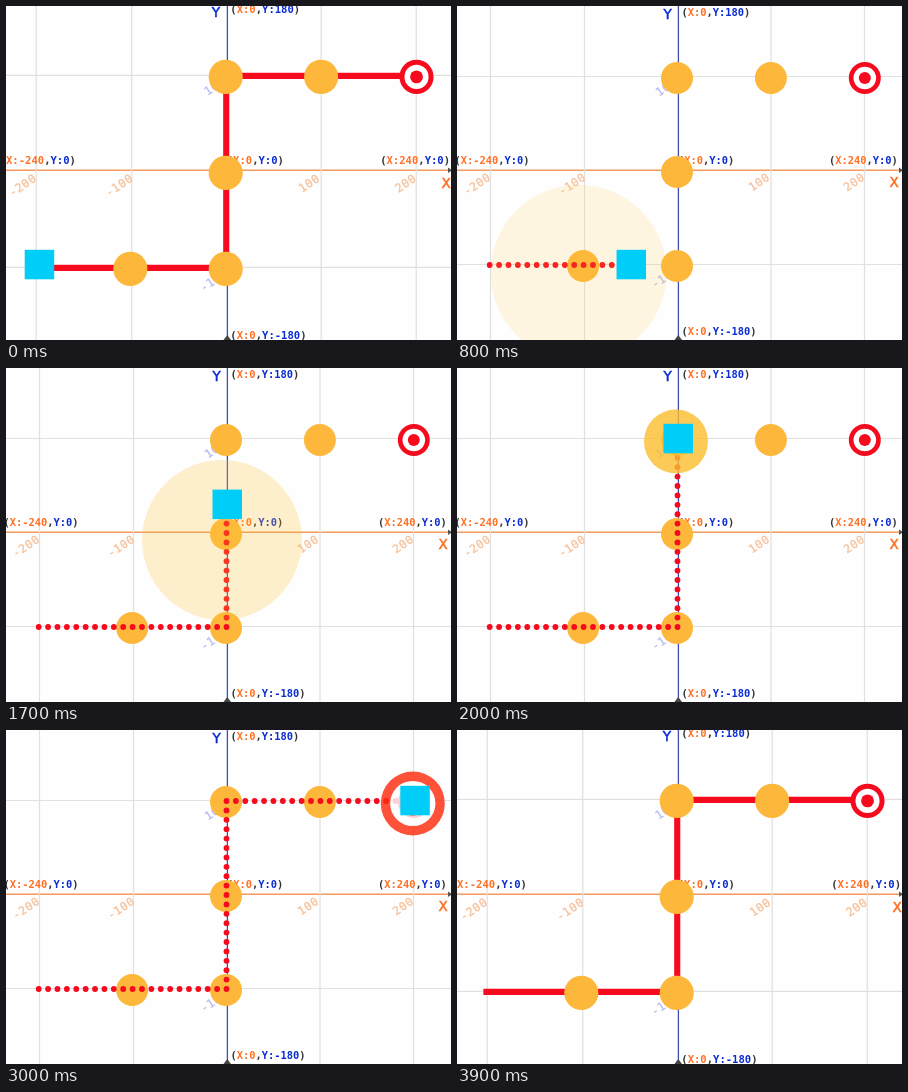
An HTML page that plays this animation: 445 by 334 pixels, repeating every 4 s.

```html
<!DOCTYPE html>
<html lang="en">
<head>
<meta charset="utf-8">
<title>Waypoint path</title>
<style>
  html, body { margin: 0; width: 100%; height: 100%; overflow: hidden; background: #fefefe; }
  svg { display: block; width: 445px; height: 334px; }
  text { font-family: "DejaVu Sans Mono", monospace; }
  .coord { font-size: 10.4px; font-weight: bold; fill: #333; }
  .tick { font-size: 11.5px; text-anchor: middle; letter-spacing: 0.6px; stroke-width: 0.3; }
  .axis { font-family: "DejaVu Sans", sans-serif; font-size: 13.5px; text-anchor: middle; stroke-width: 0.5; }
</style>
</head>
<body>
<svg id="stage" viewBox="0 0 445 334" xmlns="http://www.w3.org/2000/svg">
  <g id="axes"></g>
  <g id="world">
    <g id="plane"></g>
    <g id="line"></g>
    <g id="nodes"></g>
    <g id="dots"></g>
  </g>
  <g id="pulses"></g>
  <rect id="player" width="29.5" height="29.5" fill="#00cdf8"/>
</svg>
<script>
const LOOP = 4000, TICK = 100, CUT = 3400;
const RED = "#f50a1e", GOLD = "#fdb83c", ORANGE = "#ff7024", BLUE = "#0a2cd2";
const STOPS = [[-200, -100], [-100, -100], [0, -100], [0, 0], [0, 100], [100, 100], [200, 100]];
const HITS = [510, 960, 1455, 1955, 2475, 2955];
const TOTAL = 600;

const $ = id => document.getElementById(id);
const px = u => 220.5 + 0.939 * u;
const py = v => 165 - 0.94 * v;

function add(parent, tag, attrs, content) {
  const el = document.createElementNS("http://www.w3.org/2000/svg", tag);
  for (const k in attrs) el.setAttribute(k, attrs[k]);
  if (content) el.textContent = content;
  parent.appendChild(el);
  return el;
}

function along(d) {
  const i = Math.min(Math.floor(d / 100), STOPS.length - 2);
  const f = d / 100 - i, [a, b] = [STOPS[i], STOPS[i + 1]];
  return [a[0] + (b[0] - a[0]) * f, a[1] + (b[1] - a[1]) * f];
}

function rule(parent, d, stroke, w) {
  add(parent, "path", { d, stroke, "stroke-width": w, fill: "none" });
}

function coord(x, y, cx, cy) {
  const t = add($("plane"), "text", { class: "coord", x, y });
  const span = (s, fill) => add(t, "tspan", { fill }, s);
  span("(", "#333");
  span("X:" + cx, ORANGE);
  span(",", "#333");
  span("Y:" + cy, BLUE);
  span(")", "#333");
}

function tick(x, y, label, fill) {
  add($("plane"), "text", {
    class: "tick", fill, stroke: fill, dy: "0.36em",
    transform: `translate(${x} ${y}) rotate(-34)`
  }, label);
}

function marker(parent, isTarget, red, gold) {
  const g = add(parent, "g", {});
  const disc = (r, fill) => add(g, "circle", { r, fill });
  if (isTarget) {
    disc(16, red);
    disc(11.3, "#fff");
    disc(6, red);
  } else disc(16, gold);
  return g;
}

function buildPlane() {
  const axes = $("axes"), plane = $("plane");
  rule(axes, "M-5 164.3H450", "#f39a5c", 1.5);
  rule(axes, "M221.4 -5V333", "#3c50b8", 1.3);
  add(axes, "path", { d: "M217.5 334L221.3 329L225 334Z", fill: "#444" });
  add(axes, "path", { d: "M442 161.5L446 164.3L442 167Z", fill: "#555" });

  for (const x of [33.5, 127.5, 314, 407.5]) rule(plane, `M${x} -5V340`, "#e0e0e0", 1.2);
  for (const y of [70.5, 258.5]) rule(plane, `M-5 ${y}H450`, "#e0e0e0", 1.2);

  tick(20, 178, "-200", "#f5c09a");
  tick(115, 178, "-100", "#f5c09a");
  tick(302, 176, "100", "#f5c09a");
  tick(397, 176, "200", "#f5c09a");
  tick(209, 81, "100", "#bcbcf0");
  tick(208, 271, "-100", "#bcbcf0");

  coord(224.5, 9.5, "0", "180");
  coord(224.5, 328.5, "0", "-180");
  coord(-2.5, 157.5, "-240", "0");
  coord(372, 157.5, "240", "0");
  coord(221, 157.5, "0", "0");
  add(plane, "text", { class: "axis", x: 210.5, y: 13, fill: BLUE, stroke: BLUE }, "Y");
  add(plane, "text", { class: "axis", x: 437, y: 181, fill: ORANGE, stroke: ORANGE }, "X");
}

buildPlane();

const route = add($("line"), "path", {
  d: "M" + STOPS.map(([u, v]) => px(u) + " " + py(v)).join("L"),
  fill: "none", stroke: RED, "stroke-width": 6, "stroke-linecap": "square", pathLength: TOTAL
});

const spots = STOPS.slice(1).map(([u, v]) => [px(u) - 0.5, py(v) + 1]);
const isLast = i => i === spots.length - 1;
const nodes = spots.map((_, i) => marker($("nodes"), isLast(i), RED, GOLD));
const pulses = spots.map((_, i) => marker($("pulses"), isLast(i), "#ff2a0c", "#fcbe30"));

const dots = [];
for (let d = 0; d < TOTAL; d += 10) {
  const [u, v] = along(d);
  dots.push(add($("dots"), "circle", { cx: px(u), cy: py(v), r: 2.9, fill: RED }));
}

const show = (el, on) => el.setAttribute("display", on ? "inline" : "none");
const place = (el, x, y, s) => el.setAttribute("transform", `translate(${x} ${y}) scale(${s})`);

function render(time) {
  const t = Math.floor((time % LOOP) / TICK) * TICK;
  const opening = t < 100, zoomed = opening || t >= CUT;

  // Closer view with the solid route
  $("world").setAttribute("transform", zoomed ? "matrix(1.016 0 0 1.021 -3.8 -2.6)" : "");
  nodes.forEach((node, i) => place(node, ...spots[i], zoomed ? 1.05 : 1));
  const drawn = opening ? TOTAL : Math.max(0, Math.min(TOTAL, (t - 3450) * 4 / 3));
  show(route, zoomed && drawn > 0);
  route.setAttribute("stroke-dasharray", drawn >= TOTAL ? "none" : `${drawn} 2000`);

  // Player walks in steps of ten units, leaving dots
  const raw = opening ? 0 : 150 + (t - 800) * 0.2045;
  const dist = Math.max(0, Math.min(TOTAL, Math.round(raw / 10) * 10));
  const [u, v] = along(dist);
  const player = $("player");
  player.setAttribute("x", px(u) - 14);
  player.setAttribute("y", py(v) - 15.2);
  show(player, t < CUT);
  dots.forEach((dot, i) => show(dot, !zoomed && i * 10 < dist));

  // Each reached marker swells and fades
  pulses.forEach((p, i) => {
    const n = 1 + Math.floor((t - HITS[i]) / 33);
    const on = n >= 1 && n < 10;
    show(p, on);
    if (!on) return;
    const grow = n / 2, [x, y] = spots[i];
    place(p, x - grow, y + grow * 1.5, 1 + grow);
    p.setAttribute("opacity", 1 - 0.095 * n);
  });
}

function loop() {
  render(performance.now());
  requestAnimationFrame(loop);
}
loop();
</script>
</body>
</html>
```
